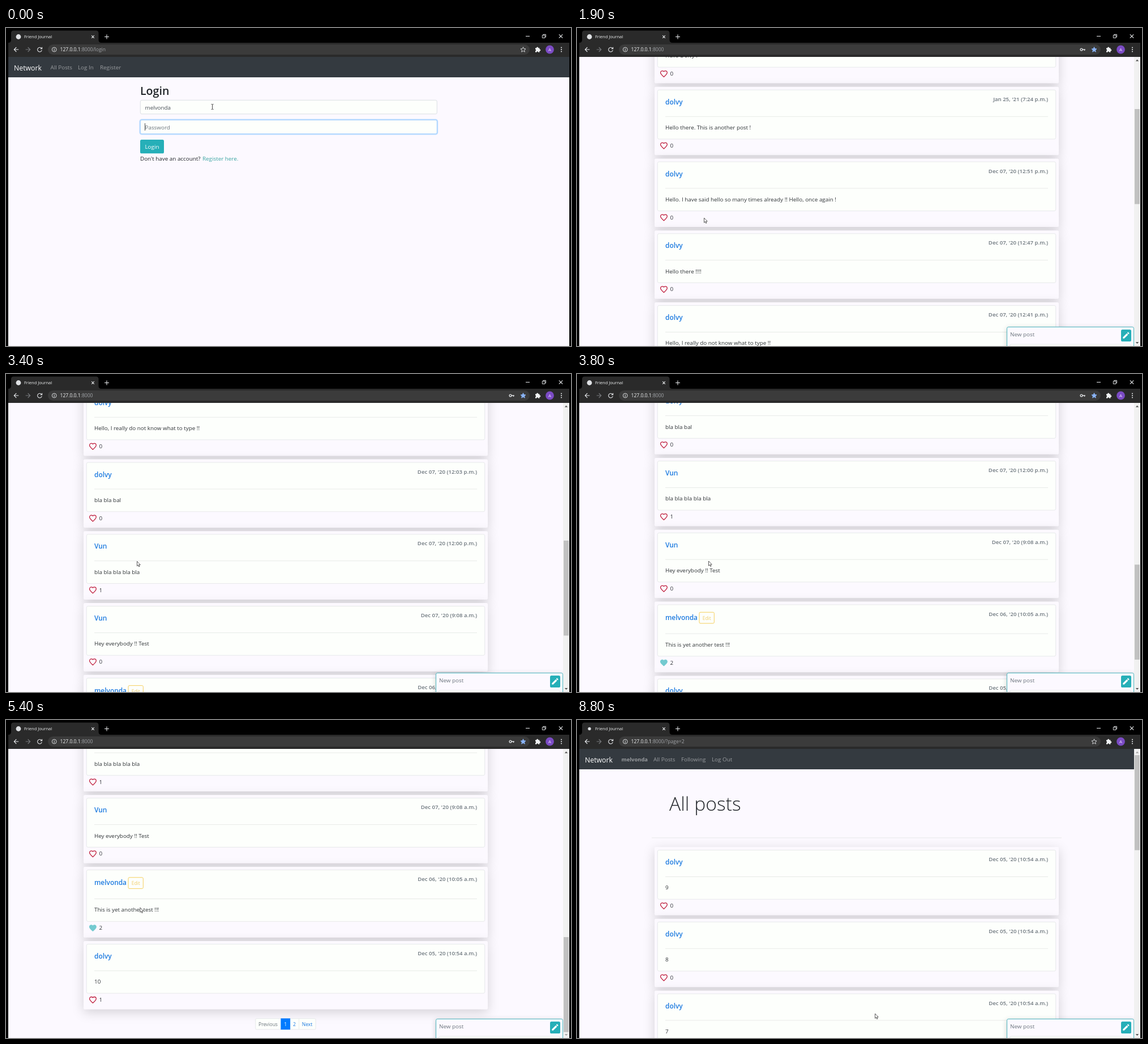
An HTML page that plays this animation: 998 by 561 pixels, repeating every 8.9 s.

```html
<!DOCTYPE html>
<html lang="en">
<head>
<meta charset="utf-8">
<title>Friend Journal</title>
<style>
  html, body { margin: 0; width: 100%; height: 100%; overflow: hidden; background: #000; }
  svg { display: block; width: 100%; height: 100%; font: 9.85px "Open Sans", "Noto Sans", sans-serif; fill: #212529; }
  .page { fill: #fcf9ff; }
  .paper { fill: #fdfffc; stroke: #dfe1e2; stroke-width: .7; }
  .rule { fill: #e3e5e3; }
  .card { fill: #fcf9ff; filter: drop-shadow(0 5px 10px rgba(0, 0, 0, .16)); }
  .name { font-size: 11.9px; font-weight: 600; fill: #1e7be0; }
  .date { font-size: 9.6px; font-weight: 600; fill: #6c757d; text-anchor: end; }
  .body { fill: #303438; }
  .muted { fill: #6c757d; }
  .nav { fill: #999c9f; }
  .teal { fill: #26afb8; }
  .line { fill: none; stroke: #e8eaed; stroke-width: 1.1; }
  .pager text { font-size: 8.5px; text-anchor: middle; }
  .cursor { fill: #fff; stroke: #333; stroke-width: .8; stroke-linejoin: round; }
</style>
</head>
<body>
<svg viewBox="0 0 998 561" xmlns="http://www.w3.org/2000/svg">
  <rect class="page" width="998" height="561"/>

  <g id="login">
    <rect x="4" y="51" width="991" height="36" fill="#343a40"/>
    <text x="14" y="74.5" font-size="12.3" fill="#fff">Network</text>
    <g class="nav">
      <text x="78.5" y="73">All Posts</text><text x="127" y="73">Log In</text><text x="166" y="73">Register</text>
    </g>
    <text x="237" y="118" font-size="19.6" font-weight="600">Login</text>
    <rect class="paper" x="237.3" y="127.3" width="524" height="24.4" rx="2.6" style="stroke:#ced4da"/>
    <text x="245.5" y="143.5" fill="#495057">melvonda</text>
    <rect x="236.4" y="161.4" width="525.8" height="26.2" rx="3.4" fill="none" stroke="#bfdeff" stroke-width="2"/>
    <rect class="paper" x="237.3" y="162.3" width="524" height="24.4" rx="2.6" style="stroke:#80bdff"/>
    <text id="password" x="245.5" y="178.5"></text>
    <rect id="caret" y="168" width=".8" height="13"/>
    <rect class="teal" x="237" y="197" width="42" height="24.3" rx="2.6"/>
    <text x="245.5" y="213.3" fill="#fff">Login</text>
    <text x="237" y="233.5">Don't have an account?</text>
    <text x="347" y="233.5" fill="#3ba5a3">Register here.</text>
  </g>

  <g id="feed">
    <g id="scroller">
      <rect x="4" y="51" width="991" height="36" fill="#343a40"/>
      <text x="14" y="74.5" font-size="12.3" fill="#fff">Network</text>
      <g class="nav">
        <text x="78.5" y="73" font-size="9.4" font-weight="700">melvonda</text>
        <text x="135" y="73">All Posts</text><text x="184" y="73">Following</text><text x="238" y="73">Log Out</text>
      </g>
      <text x="163" y="160" font-size="33.7" font-weight="300">All posts</text>
      <rect class="rule" x="132" y="207.5" width="724" height=".8"/>
      <g id="first">
        <g class="pager">
          <rect class="paper" x="440.7" y="1505.7" width="106.3" height="19.2" rx="2"/>
          <rect x="485.3" y="1505.4" width="16.8" height="19.8" fill="#007bff"/>
          <rect class="rule" x="517" y="1506" width=".7" height="19"/>
          <text class="muted" x="463" y="1519">Previous</text>
          <text x="493.7" y="1519" fill="#fff">1</text>
          <g fill="#1e7be0"><text x="509.5" y="1519">2</text><text x="532" y="1519">Next</text></g>
        </g>
      </g>
      <g id="second"></g>
    </g>
    <g>
      <rect class="page" x="759.5" y="527.5" width="224" height="50" rx="2.6" style="stroke:#4fb8c0;filter:drop-shadow(0 2px 4px rgba(0,0,0,.2))"/>
      <text class="muted" x="765" y="544">New post</text>
      <rect class="teal" x="961" y="532" width="18" height="21" rx="2.6"/>
      <path transform="translate(962.4 534.8) scale(.62)" fill="#fff" d="M3 17.25V21h3.75L17.81 9.94l-3.75-3.75zM20.71 7.04a1 1 0 000-1.41l-2.34-2.34a1 1 0 00-1.41 0l-1.83 1.83 3.75 3.75z"/>
      <rect class="paper" x="764.5" y="558" width="214" height="20" rx="2.6"/>
    </g>
    <rect x="984" y="51" width="11" height="510" fill="#f1f1f1"/>
    <rect id="thumb" x="985" width="9" height="167.6" fill="#c1c1c1"/>
    <path id="up" d="M986.8 58.5h5.4l-2.7-3z"/>
    <path id="down" d="M986.8 554h5.4l-2.7 3z"/>
  </g>

  <g id="browser">
    <path d="M0 0H998V561H995V26H4V561H0z" fill="#000"/>
    <path d="M4 51V26q5 0 5-5V9q0-4.500 4.500-4.500H159q4.500 0 4.500 4.500V21q0 5 5 5H995V51z" fill="#2a2a2a"/>
    <circle id="favicon" cx="22" cy="15.500" fill="#dfe1e4"/>
    <text x="32" y="18" font-size="7.5" fill="#f1f3f4">Friend Journal</text>
    <path class="line" d="M151.200 13.200l4.600 4.600m0-4.600l-4.600 4.600M174 15.500h8m-4-4v8M918 14.500h7M976.800 11.300l6.400 6.400m0-6.400l-6.400 6.400"/>
    <path class="line" style="stroke-width:.9" d="M947.300 12.800h4.700v4.700h-4.700zM948.800 12.500v-1.200h4.700v4.700h-1.200"/>
    <rect x="74" y="29" width="851" height="18" rx="9" fill="#3b3b3b"/>
    <path class="line" d="M22.300 38H14.300m4-4l-4 4 4 4"/>
    <path class="line" style="stroke:#77797c" d="M34.700 38h8m-4-4l4 4-4 4"/>
    <path class="line" d="M62.700 35.800a3.900 3.900 0 1 0 .6 3.400M63.600 33.800v3h-3"/>
    <circle class="line" cx="85.200" cy="38" r="3.900" style="stroke-width:.9"/>
    <path class="line" d="M85.200 37.500v2.700m0-4.400v1"/>
    <text x="95.500" y="41.200" font-size="8.55" fill="#f1f3f4">127.0.0.1<tspan id="path" fill="#a2a5a9"></tspan></text>
    <g id="key" fill="none" stroke="#dfe1e4" stroke-width="1.3"><circle cx="891" cy="38" r="1.900"/><path d="M893 38h4.800m-1.300 0v2"/></g>
    <path id="star" stroke-width=".9" stroke-linejoin="round" d="M913.500 33.600l1.300 3 3.200.3-2.400 2.100.7 3.200-2.800-1.700-2.800 1.700.7-3.200-2.400-2.100 3.200-.3z"/>
    <path fill="#f1f3f4" d="M935 35.300h2.200a1.500 1.500 0 1 1 2.900 0h2.300v2.300a1.500 1.500 0 1 1 0 2.900v2.300h-2.200a1.500 1.500 0 0 0-3 0H935v-2.300a1.500 1.500 0 0 0 0-2.900z"/>
    <circle cx="960.500" cy="38" r="7.400" fill="#7b4bc4"/>
    <text x="960.500" y="40.900" font-size="7.8" fill="#eee2ff" text-anchor="middle">A</text>
    <g fill="#f1f3f4"><circle cx="981" cy="34.600" r="1"/><circle cx="981" cy="38" r="1"/><circle cx="981" cy="41.400" r="1"/></g>
  </g>

  <g id="cursor">
    <path id="arrow" class="cursor" d="M0 0V8.300L1.900 6.600 3.200 9.500 4.500 8.900 3.200 6.100H5.800z"/>
    <path id="hand" class="cursor" d="M-1 .8Q0-.8 1 .8V4.200L5 5Q5.800 5.300 5.600 6.500L4.800 9.500V11.200H-.2V10L-3.200 6.800Q-3.400 5.300-1 6.400z"/>
    <path id="beam" fill="none" stroke="#333" stroke-width=".9" d="M-2-4.500h1.300L0-4 .7-4.500H2M0-4V4M-2 4.500h1.300L0 4l.7.500H2"/>
  </g>
</svg>
<script>
const LOOP = 8900, STEP = 100;
const CARD_TOP = 224, CARD_PITCH = 126.75, EDIT_EXTRA = 4.15, MAX_SCROLL = 979;
const HEART = "M12 21.35l-1.45-1.32C5.4 15.36 2 12.28 2 8.5 2 5.42 4.42 3 7.5 3c1.74 0 3.41.81 4.5 2.09C13.09 3.81 14.76 3 16.5 3 19.58 3 22 5.42 22 8.5c0 3.78-3.4 6.86-8.55 11.54z";
const $ = id => document.getElementById(id);
const show = (id, on) => $(id).setAttribute("display", on ? "inline" : "none");
const move = (id, x, y) => $(id).setAttribute("transform", `translate(${x} ${y})`);

// [author, date, text, likes]
const firstPage = [
  ["Vun", "Jan 25, '21 (7:27 p.m.)", "Hello Dolvy !", 0],
  ["dolvy", "Jan 25, '21 (7:24 p.m.)", "Hello there. This is another post !", 0],
  ["dolvy", "Dec 07, '20 (12:51 p.m.)", "Hello. I have said hello so many times already !! Hello, once again !", 0],
  ["dolvy", "Dec 07, '20 (12:47 p.m.)", "Hello there !!!!", 0],
  ["dolvy", "Dec 07, '20 (12:41 p.m.)", "Hello, I really do not know what to type !!", 0],
  ["dolvy", "Dec 07, '20 (12:03 p.m.)", "bla bla bal", 0],
  ["Vun", "Dec 07, '20 (12:00 p.m.)", "bla bla bla bla bla", 1],
  ["Vun", "Dec 07, '20 (9:08 a.m.)", "Hey everybody !! Test", 0],
  ["melvonda", "Dec 06, '20 (10:05 a.m.)", "This is yet another test !!!", 2],
  ["dolvy", "Dec 05, '20 (10:54 a.m.)", "10", 1],
];
const secondPage = [9, 8, 7].map(n => ["dolvy", "Dec 05, '20 (10:54 a.m.)", n, 0]);

function cards(posts) {
  let top = CARD_TOP;
  return posts.map(([author, date, text, likes]) => {
    const own = author === "melvonda", extra = own ? EDIT_EXTRA : 0;
    const heart = own
      ? `scale(.65) translate(-12 -12.2)" fill="#74cad0"`
      : `scale(.585) translate(-12 -12.2)" fill="none" stroke="#c0213f" stroke-width="2.2"`;
    const edit = own ? `<rect x="216" y="18.800" width="26.300" height="19.600" rx="2" fill="none" stroke="#f5cf5c"/>
      <text x="229.200" y="32" font-size="8.4" fill="#f0cd6a" text-anchor="middle">Edit</text>` : "";
    const markup = `<g transform="translate(0 ${top})">
      <rect class="card" x="137" width="714" height="${120.6 + extra}" rx="2.6"/>
      <rect class="paper" x="142.300" y="5.500" width="703.400" height="${86.7 + extra}" rx="2.6"/>
      <text class="name" x="156" y="${31 + extra / 4}">${author}</text>${edit}
      <text class="date" x="832" y="25">${date}</text>
      <rect class="rule" x="156" y="${52 + extra}" width="676" height=".8"/>
      <text class="body" x="156" y="${75.3 + extra}">${text}</text>
      <path transform="translate(153.400 ${104 + extra}) ${heart} d="${HEART}"/>
      <text class="body" x="164.500" y="${107.200 + extra}">${likes}</text></g>`;
    top += CARD_PITCH + extra;
    return markup;
  }).join("");
}
$("first").insertAdjacentHTML("afterbegin", cards(firstPage));
$("second").innerHTML = cards(secondPage);

// Linear interpolation through [time, ...values] points
function along(points, t) {
  const next = points.findIndex(p => p[0] > t);
  if (next === 0) return points[0].slice(1);
  if (next < 0) return points.at(-1).slice(1);
  const a = points[next - 1], b = points[next], k = (t - a[0]) / (b[0] - a[0]);
  return a.slice(1).map((v, i) => v + (b[i + 1] - v) * k);
}
const scrollPath = [[1100, 0], [1900, 247], [2600, 448.5], [3800, 836.5], [4100, 838], [4350, 902],
  [4700, 902], [4800, 924], [4900, 967], [5100, 967], [5300, MAX_SCROLL]];
const cursorPath = [[0, 364.5, 139], [300, 364.5, 139], [700, 256, 211], [1000, 254, 214], [1700, 224.5, 335],
  [1900, 224.5, 335], [2600, 229.5, 331.5], [3800, 232.5, 330], [4800, 236, 330.5], [5500, 237, 331],
  [7000, 452.3, 496], [7300, 452.3, 496], [7900, 509, 534], [8200, 509, 534], [8800, 526.5, 518]];

function draw(t) {
  const login = t < 1000, second = t >= 8200, middle = !login && !second;
  show("login", login);
  show("feed", !login);
  show("first", middle);
  show("second", second);

  const typed = Math.max(0, Math.min(8, Math.floor((t - 100) / 70)));
  $("password").textContent = typed ? "•".repeat(typed) : "Password";
  $("password").setAttribute("fill", typed ? "#495057" : "#6c757d");
  $("caret").setAttribute("x", 245.2 + (typed ? $("password").getComputedTextLength() : 0));

  const scroll = second ? 0 : along(scrollPath, t)[0];
  move("scroller", 0, -scroll);
  $("thumb").setAttribute("y", 62 + scroll / MAX_SCROLL * 321);
  $("up").setAttribute("fill", scroll > 0 ? "#505050" : "#a3a3a3");
  $("down").setAttribute("fill", scroll < MAX_SCROLL ? "#505050" : "#a3a3a3");

  $("path").textContent = ":8000" + (login ? "/login" : second ? "/?page=2" : "");
  $("favicon").setAttribute("r", t === 900 || t >= 8100 ? 2.7 : 4.4);
  show("key", middle);
  $("star").setAttribute("fill", middle ? "#8ab4f8" : "none");
  $("star").setAttribute("stroke", middle ? "#8ab4f8" : "#dfe1e4");

  const beam = t < 600;
  const hand = t >= 600 && login || t >= 4800 && t < 4900 || t >= 7900 && t < 8200;
  show("beam", beam);
  show("hand", hand);
  show("arrow", !beam && !hand);
  move("cursor", ...along(cursorPath, t));
}

function tick() {
  draw(Math.floor(performance.now() % LOOP / STEP) * STEP);
  requestAnimationFrame(tick);
}
tick();
</script>
</body>
</html>
```
